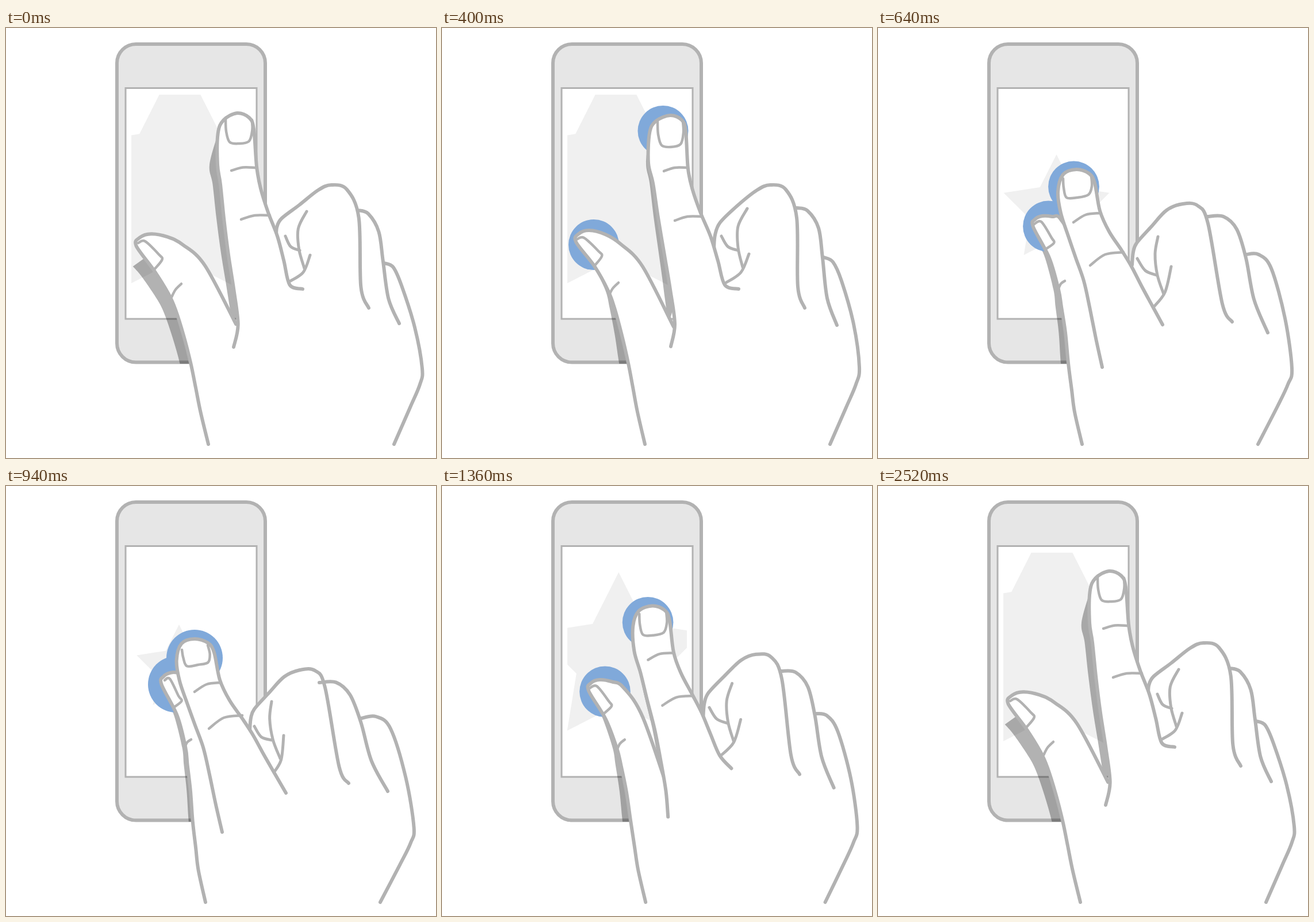
An HTML page for the animation above (2.64 s loop, 748 px wide and 748 px high).

```html
<!DOCTYPE html>
<html lang="en">
<head>
<meta charset="utf-8">
<title>Pinch gesture</title>
<style>
  html, body { margin: 0; width: 100%; height: 100%; overflow: hidden; background: #fff; }
  svg { display: block; width: 100vw; height: 100vh; }
  .hand path { stroke: #b2b2b2; stroke-linecap: round; stroke-linejoin: round; fill: none; }
  .hand .skin { stroke: none; fill: #fff; }
  .shadow path { fill: #000; fill-opacity: .3; }
  circle { fill: #80a9da; }
</style>
</head>
<body>
<svg viewBox="0 0 748 748">
  <defs>
    <clipPath id="phoneClip"><rect x="190" y="25" width="264" height="559" rx="36"/></clipPath>
    <clipPath id="pictureClip"><rect x="218" y="116" width="208" height="379"/></clipPath>
  </defs>
  <rect x="193" y="28" width="258" height="553.5" rx="33" fill="#e6e6e6" stroke="#b2b2b2" stroke-width="6"/>
  <rect x="208" y="104.5" width="228" height="401.5" fill="#fff" stroke="#b2b2b2" stroke-width="3"/>
  <g clip-path="url(#pictureClip)"><path id="star" fill="#f0f0f0"/></g>
  <g class="shadow" clip-path="url(#phoneClip)"></g>
  <circle id="thumbDot"/>
  <circle id="indexDot"/>
  <g class="hand"></g>
</svg>
<script>
const LOOP = 2640;

// Poses: 0 hover, 1 wide, 2 pinch, 3 tight. Pairs are [ms, value].
const POSE_KEYS = [[0, 0], [220, 0], [220, .25], [350, 1], [460, 1], [460, 1.2], [640, 2], [700, 2],
  [700, 2.85], [940, 3], [1200, 3], [1200, 2.75], [1280, 2], [1320, 2], [1320, 1.8],
  [1480, 1], [2520, 1], [2520, 0], [LOOP, 0]];
const RADIUS_KEYS = [[0, 0], [220, 0], [400, 44], [700, 44.5], [940, 49], [1200, 49],
  [1280, 44.5], [1480, 44], [2520, 44], [2520, 0], [LOOP, 0]];

const shapes = {};

// Shifts points by offsets spread evenly along the curve.
function shifted(points, offsets) {
  const count = points.length / 2, knots = offsets.length / 2;
  return points.map((v, j) => {
    const axis = j % 2, u = (j >> 1) / Math.max(1, count - 1) * (knots - 1);
    const i = Math.max(0, Math.min(knots - 2, Math.floor(u)));
    const a = offsets[2 * i + axis], b = offsets[2 * i + 2 + axis] ?? a;
    return v + a + (b - a) * (u - i);
  });
}

// "wide" and "pinch" are points; "hover" and "tight" are offsets from them.
function shape(name, { wide, hover, pinch, tight }) {
  shapes[name] = [shifted(wide, hover), wide, pinch, shifted(pinch, tight)];
}

shape('thumb', {
  wide: [353,724, 340,668, 332,625, 324,583, 313,535, 300,487, 289,457, 265,414,
    233,372, 238,358, 256,352, 284,359, 311,376, 349,415, 403,520],
  hover: [-1,0, -3,0, -8,7, -3,6, -3,-5],
  pinch: [355,724, 342,668, 337,630, 331,583, 326,530, 319,485, 314,455, 298,400,
    270,346, 273,333, 286,327, 303,328, 318,333, 350,395, 395,560],
  tight: [-8,0, -6,0, 0,0, 2,-3, -10,5]
});
shape('index', {
  wide: [398,554, 405,515, 397,455, 387,395, 376,330, 367,270, 359,235, 361,183, 372,162, 397,152,
    417,160, 424,180, 428,245, 436,282, 450,322, 467,362, 480,405, 492,447, 516,454],
  hover: [-2,1, 0,0, 9,3, 5,-4, 8,-4, 5,0, 0,0],
  pinch: [390,590, 379,540, 368,485, 358,440, 344,400, 331,362, 318,322, 313,285, 322,255, 345,246,
    367,253, 377,270, 386,318, 402,354, 424,387, 441,415, 458,448, 477,483, 495,516],
  tight: [-14,12, -17,20, -8,18]
});
shape('middle', {
  wide: [473,384, 475,360, 484,338, 515,308, 548,282, 571,273, 598,281, 617,330, 619,450, 631,487],
  hover: [-3,-21, -5,0, -5,0, 0,0],
  pinch: [442,412, 444,390, 450,374, 475,346, 502,317, 530,306, 556,309, 574,340, 599,480, 616,511],
  tight: [-18,13, -18,15, -20,6]
});
shape('ring', {
  wide: [617,313, 636,318, 655,348, 662,400, 670,470, 687,517],
  hover: [-5,4, -7,7, -3,-3],
  pinch: [573,328, 601,328, 624,350, 640,400, 654,472, 678,530],
  tight: [-28,14, -25,13, -14,1]
});
shape('pinky', {
  wide: [664,399, 680,407, 695,440, 716,515, 726,590, 720,620, 703,660, 675,724],
  hover: [-6,10, -7,8, 0,0, 0,0],
  pinch: [640,394, 662,394, 684,418, 708,505, 720,592, 713,620, 695,658, 661,724],
  tight: [-22,10, -14,3, -9,1, -10,0]
});
shape('fistFold', {
  wide: [531,314, 515,345, 515,382, 523,416], hover: [-8,5, -4,2],
  pinch: [487,363, 482,393, 486,430, 497,463], tight: [-25,12, -20,11]
});
shape('fistCurl', {
  wide: [486,362, 497,380, 515,387], hover: [0,0, -4,0],
  pinch: [451,401, 465,422, 485,430], tight: [-19,17, -23,12]
});
shape('fistBase', {
  wide: [534,393, 520,425, 494,443], hover: [-5,2, -1,-2],
  pinch: [510,415, 499,460, 478,487], tight: [-27,19, -14,14]
});
shape('upperCrease', {
  wide: [386,249, 405,243, 426,243], hover: [6,-1, 8,0],
  pinch: [340,338, 361,325, 385,322], tight: [-12,20]
});
shape('lowerCrease', {
  wide: [405,335, 427,328, 452,328], hover: [4,-2, 7,-2],
  pinch: [369,413, 395,394, 427,390], tight: [-16,9]
});
shape('thumbCrease', {
  wide: [307,443, 297,453, 290,466], hover: [-2,2],
  pinch: [325,440, 318,445, 313,456], tight: [-3,1]
});
shape('indexNail', {
  wide: [375,163, 376,185, 382,204, 398,207, 415,202, 420,182, 419,163], hover: [7,-5, 7,-6, 9,-3],
  pinch: [322,262, 323,278, 328,295, 346,295, 366,290, 372,275, 371,258], tight: [-16,23, -12,16, -20,19]
});
shape('thumbNail', {
  wide: [234,368, 247,365, 272,388, 278,397, 265,414], hover: [-4,6, -6,6, -7,6],
  pinch: [272,341, 284,337, 302,365, 306,374, 291,385], tight: [4,-3, -2,0, 1,0]
});
shape('indexDot', { wide: [384.5,179], hover: [7,-3], pinch: [340.5,276], tight: [-12.5,23] });
shape('thumbDot', { wide: [264,377], hover: [-6,6], pinch: [296.5,345], tight: [-.5,0] });
// Top tip, then centre.
shape('star', { wide: [302.5,45, 302.5,281], hover: [0,0], pinch: [310.5,220, 310.5,316.7], tight: [-9.5,21, -9.5,1.7] });
// Shadow distances per pose: dx at the base, dx and dy towards the tip.
shapes.indexCast = [[-11, -14, 0], [-15, -4, 0], [0, 0, 0], [0, 0, 0]];
shapes.thumbCast = [[-19, -21, 15], [-16, 3, 0], [-13, -6, 0], [-7, -5, 0]];

const byId = id => document.getElementById(id);

function addPath(group, className = '', width = 0) {
  const path = document.createElementNS('http://www.w3.org/2000/svg', 'path');
  if (className) path.setAttribute('class', className);
  if (width) path.setAttribute('stroke-width', width);
  document.querySelector(group).append(path);
  return path;
}

const lines = [];
const addLines = (width, ...names) =>
  names.forEach(name => lines.push([name, addPath('.hand', '', width)]));
const indexShadow = addPath('.shadow'), thumbShadow = addPath('.shadow');
const palmSkin = addPath('.hand', 'skin');
addLines(6, 'thumb');
addLines(4.5, 'thumbNail', 'thumbCrease');
const fistSkin = addPath('.hand', 'skin');
addLines(6, 'middle', 'ring', 'pinky');
addLines(5, 'fistFold', 'fistCurl', 'fistBase');
const indexSkin = addPath('.hand', 'skin');
addLines(4.5, 'indexNail', 'upperCrease', 'lowerCrease');
addLines(6, 'index');

function valueAt(keys, t) {
  const i = keys.findIndex(key => key[0] > t);
  const [t0, v0] = keys[i - 1], [t1, v1] = keys[i];
  return v0 + (v1 - v0) * (t - t0) / (t1 - t0);
}

function blend(name, pose) {
  const i = Math.min(2, Math.floor(pose)), k = pose - i;
  const [from, to] = [shapes[name][i], shapes[name][i + 1]];
  return from.map((v, j) => v + (to[j] - v) * k);
}

const pointAt = (points, i) => points.slice(2 * i, 2 * i + 2);

// Catmull-Rom curve through all points.
function spline(p) {
  const last = p.length / 2 - 1;
  const at = (i, axis) => p[2 * Math.max(0, Math.min(last, i)) + axis];
  let d = `M${p[0]} ${p[1]}`;
  for (let i = 0; i < last; i++) {
    const handle = (n, sign) => [0, 1].map(axis =>
      (at(n, axis) + sign * (at(n + 1, axis) - at(n - 1, axis)) / 6).toFixed(2));
    d += `C${[...handle(i, 1), ...handle(i + 1, -1), at(i + 1, 0), at(i + 1, 1)].join(' ')}`;
  }
  return d;
}

function starPath([x, top, , y]) {
  const outer = y - top;
  const points = Array.from({ length: 10 }, (_, i) => {
    const r = i % 2 ? outer * .507 : outer, a = i * Math.PI / 5;
    return `${x + r * Math.sin(a)} ${y - r * Math.cos(a)}`;
  });
  return `M${points.join('L')}Z`;
}

// Moves points away from the finger; share(i) runs from 0 at the base to 1 at the tip.
function castPoints(points, [base, tipX, tipY], share) {
  return points.map((v, j) => {
    const k = share(j >> 1);
    return v + (j % 2 ? tipY * k : base + (tipX - base) * k);
  });
}

function drawShadows(pose) {
  const index = blend('index', pose), thumb = blend('thumb', pose);
  const side = castPoints(index.slice(0, 14), blend('indexCast', pose), i => i / 6);
  indexShadow.setAttribute('d', `${spline([...side, ...pointAt(index, 7)])}L${pointAt(index, 14)}Z`);

  const before = pointAt(thumb, 7), tip = pointAt(thumb, 8);
  const end = before.map((v, axis) => (v + tip[axis]) / 2);
  const edge = castPoints([...thumb.slice(0, 16), ...end], blend('thumbCast', pose),
    i => Math.max(0, Math.min(1, (i - 3) / 5)));
  thumbShadow.setAttribute('d', `${spline(edge)}L${end}L${pointAt(thumb, 13)}Z`);
}

function render(t) {
  const pose = valueAt(POSE_KEYS, t), radius = valueAt(RADIUS_KEYS, t);
  const curve = {};
  for (const [name, path] of lines) {
    curve[name] = spline(blend(name, pose));
    path.setAttribute('d', curve[name]);
  }
  const indexEnd = blend('index', pose).slice(-2), wrist = blend('pinky', pose).slice(-2);
  palmSkin.setAttribute('d', `${curve.thumb}L${indexEnd}L${wrist}Z`);
  fistSkin.setAttribute('d', `${curve.middle}L${indexEnd}Z`);
  indexSkin.setAttribute('d', `${curve.index}Z`);
  drawShadows(pose);

  for (const name of ['indexDot', 'thumbDot']) {
    const [x, y] = blend(name, pose), dot = byId(name);
    dot.setAttribute('cx', x);
    dot.setAttribute('cy', y);
    dot.setAttribute('r', radius);
  }
  // The star settles slightly before the hand does.
  const starPose = pose > 2 ? Math.min(3, 2 + (pose - 2) / .85) : pose;
  byId('star').setAttribute('d', starPath(blend('star', starPose)));
}

let start;
function tick(now) {
  start ??= now;
  render(Math.max(0, now - start) % LOOP);
  requestAnimationFrame(tick);
}
render(0);
requestAnimationFrame(tick);
</script>
</body>
</html>
```
